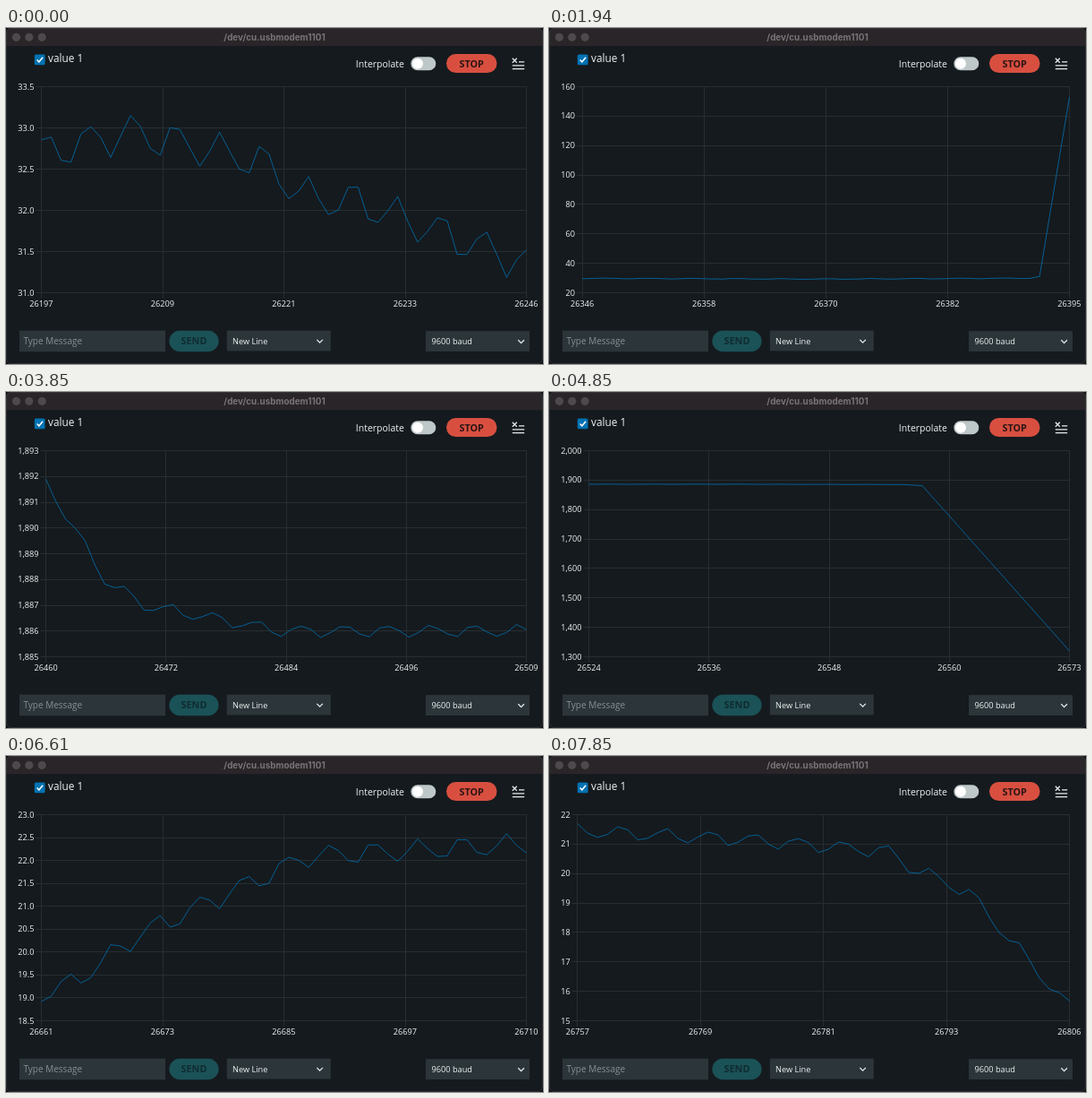
These frames come from a looping animation (600x375 px, 7.88 s). An HTML page:

```html
<!DOCTYPE html>
<html lang="en">
<head>
<meta charset="utf-8">
<title>Serial plotter</title>
<style>
  html, body { margin: 0; width: 100%; height: 100%; overflow: hidden; background: #0d0f11; }
  svg { display: block; width: 600px; height: 375px; font-family: "Open Sans", sans-serif; fill: #eef3f3; }
  .title { font: 700 9.9px Inter, sans-serif; fill: #78747a; text-anchor: middle; }
  .legend { font-size: 11.8px; }
  .option { font-size: 10.5px; }
  .button { font-size: 10.8px; font-weight: 700; text-anchor: middle; }
  .hint { font-size: 10px; fill: #868f93; }
  .choice { font-size: 9.2px; }
  .field { fill: #2c353a; }
  .stroke { fill: none; stroke: #e6ecec; stroke-width: 1.3; }
  #labels { font-size: 9.2px; }
  #grid { fill: none; stroke: #272e32; stroke-width: 1; }
  #line { fill: none; stroke: #0072b2; stroke-width: 0.8; }
</style>
</head>
<body>
<svg viewBox="0 0 600 375">
  <rect width="600" height="375" rx="5" fill="#151a1e"/>
  <path d="M0 20V5a5 5 0 0 1 5-5H595a5 5 0 0 1 5 5V20z" fill="#2a2528"/>
  <g fill="#4d494c">
    <circle cx="11.5" cy="10.3" r="4.6"/>
    <circle cx="25.8" cy="10.3" r="4.6"/>
    <circle cx="40.2" cy="10.3" r="4.6"/>
  </g>
  <text class="title" x="300" y="13.8">/dev/cu.usbmodem1101</text>

  <rect x="31.8" y="29.4" width="11.8" height="11.8" rx="1.5" fill="#0072b2"/>
  <path class="stroke" d="M34.6 35.4l2.3 2.4 4.2-5" style="stroke:#fff;stroke-width:1.5"/>
  <text class="legend" x="47" y="38.4">value 1</text>

  <text class="option" x="390.8" y="43.6">Interpolate</text>
  <rect x="452.3" y="32.2" width="28" height="15" rx="7.5" fill="#bfc8c9"/>
  <circle cx="460" cy="39.7" r="6" fill="#fff"/>
  <rect x="492" y="29" width="56.5" height="21" rx="10.5" fill="#d84f40"/>
  <text class="button" x="520.2" y="43.5" fill="#2b1514">STOP</text>
  <path class="stroke" d="M565.8 33.8l5 5m0-5l-5 5M573 37.8h6.2M565.8 41.8h13.4M565.8 45.6h13.4"/>

  <path id="grid"/>
  <path id="line"/>
  <g id="labels"></g>

  <rect class="field" x="15" y="337.7" width="163" height="23.6"/>
  <text class="hint" x="19.5" y="353">Type Message</text>
  <rect x="182.4" y="337.7" width="55.2" height="23.6" rx="11.8" fill="#1a5257"/>
  <text class="button" x="210" y="353.4" fill="#102c30">SEND</text>
  <rect class="field" x="246.8" y="337.7" width="116" height="22.8"/>
  <text class="choice" x="253" y="352.5">New Line</text>
  <path class="stroke" d="M347.3 347.9l3.3 3.3 3.3-3.3"/>
  <rect class="field" x="469" y="338.2" width="116" height="22.8"/>
  <text class="choice" x="475.5" y="353">9600 baud</text>
  <path class="stroke" d="M572.3 348.3l3.3 3.3 3.3-3.3"/>
  <rect x="0.5" y="0.5" width="599" height="374" rx="5" fill="none" stroke="#33373a" stroke-width="0.8"/>
</svg>
<script>
const LOOP = 7880, BASE = 26000, SPAN = 49;
const TOP = 65.5, BOTTOM = 295.5, RIGHT = 581.5;

// Latest sample number over time (ms); large readings arrive more slowly.
const arrivals = [[0, 246], [940, 319], [1940, 395], [3850, 509], [4656, 558],
  [4850, 573], [6610, 710], [7850, 806]];

// Turning points of the reading: slow fall, jump up, settling, drop, recovery, fall.
const trend = [
  [197, 32.7], [206, 32.95], [219, 32.6], [224, 32.15], [229, 32.1], [246, 31.35],
  [280, 31.4], [284, 31.15], [303, 30.97], [314, 30.4], [319, 30.5],
  [346, 29.8], [370, 29.3], [391, 29.9], [392, 31], [438, 1905],
  [460, 1891.8], [466, 1888], [470, 1887], [484, 1886], [540, 1886], [556, 1885], [558, 1881],
  [608, 11], [661, 19.1], [664, 19.3], [671, 20.4], [688, 22.1], [710, 22.35],
  [757, 21.45], [774, 21.15], [788, 20.75], [790, 20.25], [796, 19.35], [806, 15.45]
];

function lerpAt(points, x) {
  const last = points[points.length - 1];
  if (x >= last[0]) return last[1];
  const k = points.findIndex(p => p[0] > x);
  const [x0, y0] = points[k - 1], [x1, y1] = points[k];
  return y0 + (y1 - y0) * (x - x0) / (x1 - x0);
}

// Interference ripple with a period of 4.44 samples.
const ripple = i => -0.22 * Math.cos(2 * Math.PI * (i - 244) / 4.44) + 0.04 * Math.sin(i * 2.7);
const reading = i => lerpAt(trend, i) + ripple(i);

function niceStep(v) {
  const unit = 10 ** Math.floor(Math.log10(v));
  const f = v / unit;
  return unit * (f <= 1 ? 1 : f <= 2 ? 2 : f <= 5 ? 5 : 10);
}

// Round axis limits with at most ten steps and 2.5 % headroom.
function scaleFor(values) {
  let lo = Math.min(...values), hi = Math.max(...values);
  const grace = (hi - lo) * 0.025;
  lo -= grace;
  hi += grace;
  let step = niceStep((hi - lo) / 10);
  const spaces = () => Math.ceil(hi / step) - Math.floor(lo / step);
  if (spaces() > 10) step = niceStep(spaces() * step / 10);
  return { min: Math.floor(lo / step) * step, step, count: spaces() };
}

const pen = document.createElement("canvas").getContext("2d");
const gridPath = document.getElementById("grid");
const linePath = document.getElementById("line");
const labels = document.getElementById("labels");
const label = (x, y, anchor, text) =>
  `<text x="${x.toFixed(2)}" y="${y.toFixed(2)}" text-anchor="${anchor}">${text}</text>`;

function draw(end) {
  const start = end - SPAN;
  const values = Array.from({ length: SPAN + 1 }, (_, k) => reading(start + k));
  const { min, step, count } = scaleFor(values);
  const digits = Math.max(0, -Math.floor(Math.log10(step) + 1e-9));
  const format = { minimumFractionDigits: digits, maximumFractionDigits: digits };
  const names = Array.from({ length: count + 1 },
    (_, k) => (min + k * step).toLocaleString("en-US", format));

  pen.font = '9.2px "Open Sans", sans-serif';
  const left = 21.3 + Math.max(...names.map(n => pen.measureText(n).width));
  const yOf = v => BOTTOM - (v - min) / (step * count) * (BOTTOM - TOP);

  let grid = "", text = "";
  names.forEach((name, k) => {
    const y = yOf(min + k * step);
    grid += `M${(left - 6).toFixed(1)} ${Math.floor(y) + 0.5}H${RIGHT}`;
    text += label(left - 8, y + 3.1, "end", name);
  });
  for (let k = 0; k <= 4; k++) {
    const x = left + (RIGHT - left) * k / 4;
    grid += `M${Math.floor(x) + 0.5} ${TOP}V${BOTTOM + 6}`;
    text += label(x, 311.2, "middle", BASE + Math.floor(start + SPAN * k / 4));
  }
  gridPath.setAttribute("d", grid);
  labels.innerHTML = text;
  linePath.setAttribute("d", "M" + values.map((v, k) =>
    `${(left + (RIGHT - left) * k / SPAN).toFixed(2)} ${yOf(v).toFixed(2)}`).join("L"));
}

let shown = 0;
function tick() {
  const end = Math.floor(lerpAt(arrivals, performance.now() % LOOP) + 0.001);
  if (end !== shown) draw(shown = end);
  requestAnimationFrame(tick);
}
tick();
</script>
</body>
</html>
```
